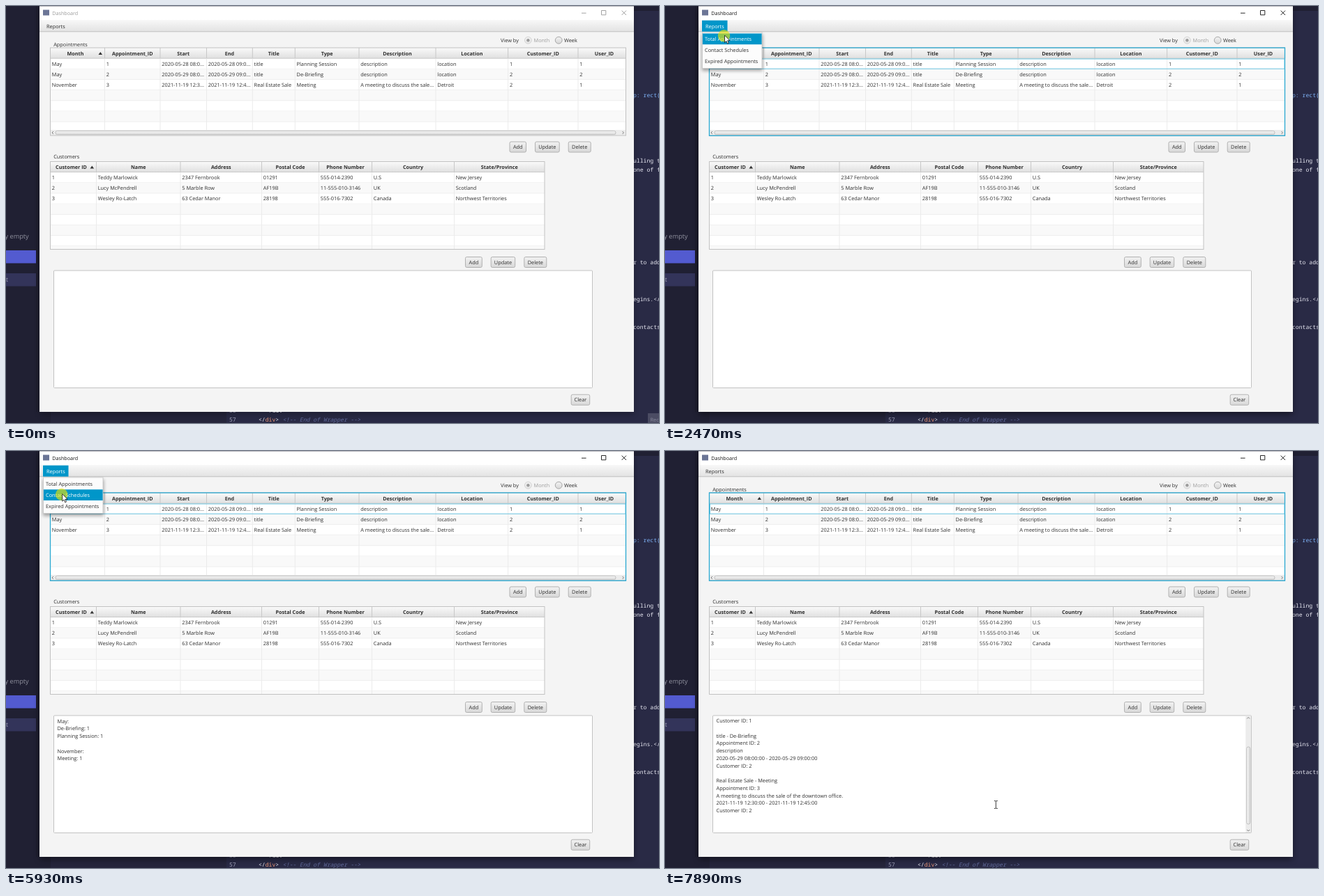
Write an HTML page that moves like this. It is 936 by 599 pixels and loops after 8 s.

```html
<!DOCTYPE html>
<html lang="en">
<head>
<meta charset="utf-8">
<title>Dashboard</title>
<style>
html, body { margin: 0; width: 100%; height: 100%; overflow: hidden; background: #202033; }
svg {
  display: block; width: 936px; height: 599px; fill: #2e2e2e;
  font-family: "Open Sans", "Noto Sans", sans-serif; font-size: 7.35px;
}
text { white-space: pre; text-rendering: geometricPrecision; }
.code { font-family: "Noto Sans Mono", "DejaVu Sans Mono", monospace; font-size: 8.1px; fill: #e8e8f2; }
.bold { font-weight: bold; font-size: 7.22px; }
.shadow { filter: blur(5px); }
.soft { filter: blur(2.5px); }
</style>
</head>
<body>
<svg id="stage" viewBox="0 0 936 599">
  <defs>
    <linearGradient id="head" x2="0" y2="1"><stop stop-color="#fafafa"/><stop offset="1" stop-color="#dfdfdf"/></linearGradient>
    <linearGradient id="bar" x2="0" y2="1"><stop stop-color="#f8f8f8"/><stop offset="1" stop-color="#e2e2e2"/></linearGradient>
    <linearGradient id="btn" x2="0" y2="1"><stop stop-color="#f2f2f2"/><stop offset="1" stop-color="#d8d8d8"/></linearGradient>
    <linearGradient id="thumbX" x2="0" y2="1"><stop stop-color="#f4f4f4"/><stop offset="1" stop-color="#dcdcdc"/></linearGradient>
    <linearGradient id="thumbY"><stop stop-color="#f4f4f4"/><stop offset="1" stop-color="#dcdcdc"/></linearGradient>
    <clipPath id="areaClip"><rect x="69" y="381" width="763" height="167"/></clipPath>
  </defs>
</svg>
<script>
const LOOP = 8000, BLUE = '#0096c9', ROW = 15.17, LINE = 10.75;
const svg = document.getElementById('stage');

function el(tag, attrs = {}, parent = svg) {
  const node = document.createElementNS('http://www.w3.org/2000/svg', tag);
  for (const k in attrs) node.setAttribute(k, attrs[k]);
  parent.appendChild(node);
  return node;
}
const group = (parent, attrs) => el('g', attrs, parent);
const rect = (x, y, width, height, fill, parent, more) =>
  el('rect', { x, y, width, height, fill, ...more }, parent);
const path = (d, attrs, parent) => el('path', { d, fill: 'none', ...attrs }, parent);
// y is the middle of the capitals
function text(x, y, str, parent, attrs) {
  const node = el('text', { x, y: y + 2.7, ...attrs }, parent);
  node.textContent = str;
  return node;
}
const show = (node, on) => { node.style.display = on ? '' : 'none'; };

// Editor behind the window
function backdrop() {
  rect(0, 0, 936, 599, '#202033');
  rect(43, 0, 5, 583, '#1d1d2e');
  rect(64, 583, 254, 16, '#25253b');
  rect(316, 583, 620, 16, '#292a45');
  rect(900, 0, 36, 599, '#292a45');
  rect(900, 0, 36, 7, '#202033');
  text(-1.5, 331, 'y empty', svg, { fill: '#8f909e', 'font-size': 9.2 });
  rect(0, 351, 43, 18.5, '#535bd0');
  rect(0, 384, 43, 18.5, '#33345a');
  text(0, 393.5, 't', svg, { fill: '#9a9bb0', 'font-size': 8.5 });
  const code = group(svg, { class: 'code' });
  text(899, 128, 'p: rect(', code, { fill: '#7fb2f5' });
  [[222, 'ulling t'], [235, 'one of f'], [368, 'r to add'], [421, 'egins.</'], [461, 'contacts']]
    .forEach(([y, s]) => text(899, y, s, code));
  text(320, 580.8, '56', code, { fill: '#a3a4bd' });
  text(372, 580.8, '</div>', code);
  text(320, 594, '57', code, { fill: '#a3a4bd' });
  text(362, 594, '</', code);
  text(371.7, 594, 'div', code, { fill: '#ef9a7a' });
  text(386.3, 594, '>', code);
  text(396.5, 594, '<!-- End of Wrapper -->', code, { fill: '#626b9c', 'font-style': 'italic' });
}

function table(x, y, w, bottom, cols, heads, rows) {
  const top = y + 15.5, right = x + w;
  rect(x, y, w, bottom - y, '#fff');
  for (let i = 0; top + i * ROW < bottom; i++) {
    const ry = top + i * ROW, h = Math.min(ROW, bottom - ry);
    if (i % 2) rect(x, ry, w, h, '#f9f9f9');
    if (h === ROW) rect(x, ry + ROW - .8, w, .8, '#ececec');
  }
  rect(x, y, w, 15.5, 'url(#head)');
  rect(x, top - .8, w, .8, '#c4c4c4');
  let left = x;
  cols.forEach((c, i) => {
    text((left + c) / 2 - (i ? 0 : 3), y + 8, heads[i], svg, { class: 'bold', 'text-anchor': 'middle' });
    if (c < right) {
      rect(c - .5, y, 1, 15.5, '#c8c8c8');
      rect(c - .5, top, 1, bottom - top, '#ebebeb');
    }
    rows.forEach((r, j) => text(left + 2.3, top + 7.4 + j * ROW, r[i]));
    left = c;
  });
  path(`M${cols[0] - 9} ${y + 10}h5.6l-2.8-4z`, { fill: '#333' });
}

function frame(x, y, w, h, color, width = 1, parent) {
  return rect(x, y, w, h, 'none', parent, { stroke: color, 'stroke-width': width });
}

function button(x, y, w, label) {
  rect(x + .5, y + .5, w - 1, 15, 'url(#btn)', svg, { rx: 2, stroke: '#b1b1b1' });
  text(x + w / 2, y + 8, label, svg, { 'text-anchor': 'middle' });
}

function radio(x, on) {
  const g = group(svg, { opacity: on ? .45 : 1 });
  el('circle', { cx: x, cy: 49.2, r: 4.9, fill: 'url(#btn)', stroke: '#a6a6a6' }, g);
  if (on) el('circle', { cx: x, cy: 49.2, r: 2.2, fill: '#333' }, g);
}

backdrop();
const badge = group(svg);
rect(920, 585, 16, 14, '#4b4c63', badge);
text(923.5, 594, 'Rec', badge, { fill: '#8b8ca0' });

const glow = rect(49, 4, 850, 582, '#000', svg, { class: 'shadow' });
rect(48, 0, 852, 583, '#f4f4f4');
rect(48, 0, 852, 20, '#fff');
rect(48, 0, 852, .7, '#9a9aa4');
rect(53, 5.5, 9, 8, '#6b7596');
const title = text(66.3, 10, 'Dashboard', svg, { 'font-size': 7.15 });
const controls = path('M825 10.2h6.6M853.5 6.5h6.3v6.3h-6.3zM882.6 6.6l6.4 6.4M889 6.6l-6.4 6.4', { 'stroke-width': .9 });
rect(48, 20, 852, 17, 'url(#bar)');
rect(48, 36.4, 852, .9, '#bcbcbc');

text(709, 49.5, 'View by');
radio(748.4, true);
text(756.5, 49.5, 'Month', svg, { fill: '#9d9d9d' });
radio(792.2, false);
text(800, 49.5, 'Week');

text(68.2, 55, 'Appointments');
table(63.5, 60, 825, 178, [141.5, 221, 287.5, 353.3, 414.3, 506, 616, 719.6, 820, 895],
  ['Month', 'Appointment_ID', 'Start', 'End', 'Title', 'Type', 'Description', 'Location', 'Customer_ID', 'User_ID'],
  [
    ['May', '1', '2020-05-28 08:0...', '2020-05-28 09:0...', 'title', 'Planning Session', 'description', 'location', '1', '1'],
    ['May', '2', '2020-05-29 08:0...', '2020-05-29 09:0...', 'title', 'De-Briefing', 'description', 'location', '2', '2'],
    ['November', '3', '2021-11-19 12:3...', '2021-11-19 12:4...', 'Real Estate Sale', 'Meeting', 'A meeting to discuss the sale...', 'Detroit', '2', '1']
  ]);
rect(63.5, 178, 825, 8, '#ececec');
rect(71, 179.3, 803, 5.4, 'url(#thumbX)', svg, { rx: 2.5, stroke: '#b8b8b8', 'stroke-width': .8 });
path('M68 180l-2 2 2 2M883.5 180l2 2-2 2', { stroke: '#777', 'stroke-width': .9 });
frame(63.5, 60, 825, 126, '#c2c2c2');
const focus = group(svg);
frame(63.5, 60, 825, 126.3, '#2aa9d2', 1.3, focus);
frame(64.5, 76, 823.5, 14.2, '#5cbfdd', .9, focus);

button(721.5, 194.5, 24.5, 'Add');
button(758, 194.5, 35.7, 'Update');
button(805.7, 194.5, 33, 'Delete');

text(68.2, 216, 'Customers');
table(63.5, 223.5, 708.5, 349.5, [129.5, 250, 366.5, 448.5, 524.5, 642.5, 772],
  ['Customer ID', 'Name', 'Address', 'Postal Code', 'Phone Number', 'Country', 'State/Province'],
  [
    ['1', 'Teddy Marlowick', '2347 Fernbrook', '01291', '555-014-2390', 'U.S', 'New Jersey'],
    ['2', 'Lucy McPendrell', '5 Marble Row', 'AF19B', '11-555-010-3146', 'UK', 'Scotland'],
    ['3', 'Wesley Ro-Latch', '63 Cedar Manor', '28198', '555-016-7302', 'Canada', 'Northwest Territories']
  ]);
frame(63.5, 223.5, 708.5, 126, '#c2c2c2');

button(658, 360, 24.8, 'Add');
button(694.7, 360, 35.5, 'Update');
button(742.3, 360, 33, 'Delete');
button(809.7, 557.7, 27.5, 'Clear');

// Report area
rect(68.5, 380, 772, 168.5, '#fff', svg, { rx: 1, stroke: '#c3c3c3' });
const area = group(svg, { 'clip-path': 'url(#areaClip)' });
function report(lines) {
  const g = group(area);
  lines.forEach((s, i) => s && text(73.5, 388 + i * LINE, s, g));
  return g;
}
const visit = (name, id, note, day, from, to, customer) =>
  [name, 'Appointment ID: ' + id, note, `${day} ${from}:00 - ${day} ${to}:00`, 'Customer ID: ' + customer, ''];
const totals = report(['May:', 'De-Briefing: 1', 'Planning Session: 1', '', 'November:', 'Meeting: 1']);
const schedules = report(['Ja Orr:',
  ...visit('title - Planning Session', 1, 'description', '2020-05-28', '08:00', '09:00', 1),
  ...visit('title - De-Briefing', 2, 'description', '2020-05-29', '08:00', '09:00', 2),
  ...visit('Real Estate Sale - Meeting', 3, 'A meeting to discuss the sale of the downtown office.', '2021-11-19', '12:30', '12:45', 2)]);
const scroller = group(svg);
rect(832.3, 380.5, 7.8, 167.5, '#ececec', scroller);
path('M834.2 384.5l2-2 2 2M834.2 544l2 2 2-2', { stroke: '#777', 'stroke-width': .9 }, scroller);
const thumb = rect(833.6, 388, 5.2, 111, 'url(#thumbY)', scroller, { rx: 2.5, stroke: '#b8b8b8', 'stroke-width': .8 });

// Menu
const hover = rect(53, 20.7, 36.5, 16, BLUE);
const menuLabel = text(58, 29, 'Reports');
const popup = group(svg);
rect(53, 41, 87, 52, '#000', popup, { class: 'soft', opacity: .35 });
rect(53.5, 38, 85.5, 51.5, '#fcfcfc', popup, { stroke: '#c6c6c6', 'stroke-width': .8 });
const items = ['Total Appointments', 'Contact Schedules', 'Expired Appointments'].map((label, i) => {
  const y = 39.5 + i * 15.8;
  return { band: rect(53.9, y, 84.7, 15.7, BLUE, popup), label: text(57, y + 8, label, popup) };
});

// Pointer
const ring = el('circle', { r: 8.7, fill: '#ece400', opacity: .62 });
const arrow = path('M0 0v10.6l2.4-2.2 1.6 3.8 1.8-.8-1.6-3.7h3.3z', { fill: '#fff', stroke: '#111', 'stroke-width': .8 });
const beam = path('M-2.4-5.5h1.7l.7.6.7-.6h1.7M0-5v10M-2.4 5.5h1.7l.7-.6.7.6h1.7', { stroke: '#222', 'stroke-width': .9 });

// first step, last step, steps, bend x, bend y, end x, end y
const moves = [
  [460, 880, 7, 480, 260, 71, 79],
  [1010, 1220, 4, 72, 45, 79, 19],
  [1290, 1290, 1, 80, 24, 81, 28],
  [2080, 2210, 3, 82, 35, 85.5, 42],
  [2930, 3680, 11, 42, 260, 123, 450],
  [3750, 3750, 1, 123, 456, 123.3, 463],
  [3820, 4520, 11, 430, 250, 88, 43],
  [4590, 4660, 2, 84, 34, 81.5, 28],
  [5390, 5520, 3, 81, 45, 81.5, 62],
  [5670, 5670, 1, 81, 62, 80.7, 61.6],
  [6860, 6860, 1, 110, 120, 148, 188],
  [6930, 7460, 9, 260, 400, 474.3, 508]
];
const quad = (a, b, c, s) => a * (1 - s) ** 2 + 2 * b * s * (1 - s) + c * s * s;
function pointer(t) {
  let x = 936, y = 599;
  for (const [t0, t1, n, bx, by, ex, ey] of moves) {
    if (t < t0) break;
    const gap = (t1 - t0) / (n - 1 || 1) || 1;
    const k = Math.min(n, Math.floor((t - t0) / gap + 1e-6) + 1) / n;
    const s = k * k * (3 - 2 * k);
    x = quad(x, bx, ex, s);
    y = quad(y, by, ey, s);
  }
  return [x, y];
}

const within = (t, ...spans) => spans.some(([a, b]) => t >= a && t < b);

function draw(t) {
  const active = t >= 1350;
  show(badge, t < 70);
  show(focus, active);
  glow.setAttribute('opacity', active ? .5 : .3);
  title.setAttribute('fill', active ? '#111' : '#999');
  controls.setAttribute('stroke', active ? '#111' : '#999');

  const lit = within(t, [1150, 2600], [4590, 6060]);
  show(hover, lit);
  menuLabel.setAttribute('fill', lit ? '#fff' : '#2e2e2e');
  show(popup, within(t, [1420, 2600], [4790, 6060]));
  const picked = within(t, [2210, 2600]) ? 0 : within(t, [5520, 6060]) ? 1 : within(t, [5455, 5520]) ? 0 : -1;
  items.forEach(({ band, label }, i) => {
    show(band, i === picked);
    label.setAttribute('fill', i === picked ? '#fff' : '#2e2e2e');
  });

  show(totals, within(t, [2600, 6060]));
  show(schedules, t >= 6060);
  show(scroller, t >= 6060);
  const scroll = t >= 7890 ? 54.4 : t >= 7560 ? 27.2 : 0;
  schedules.setAttribute('transform', `translate(0 ${-scroll})`);
  thumb.setAttribute('y', 388 + scroll * .68);

  const [x, y] = pointer(t);
  const inText = x > 69 && x < 832 && y > 381 && y < 548;
  show(arrow, t >= 460 && !inText);
  show(beam, t >= 460 && inText);
  for (const p of [arrow, beam]) p.setAttribute('transform', `translate(${x} ${y})`);
  show(ring, within(t, [1350, 1550], [2470, 2600], [4790, 4990], [5930, 6060]));
  ring.setAttribute('cx', x - 1);
  ring.setAttribute('cy', y + .8);
}

function tick() {
  draw(performance.now() % LOOP);
  requestAnimationFrame(tick);
}
tick();
</script>
</body>
</html>
```
